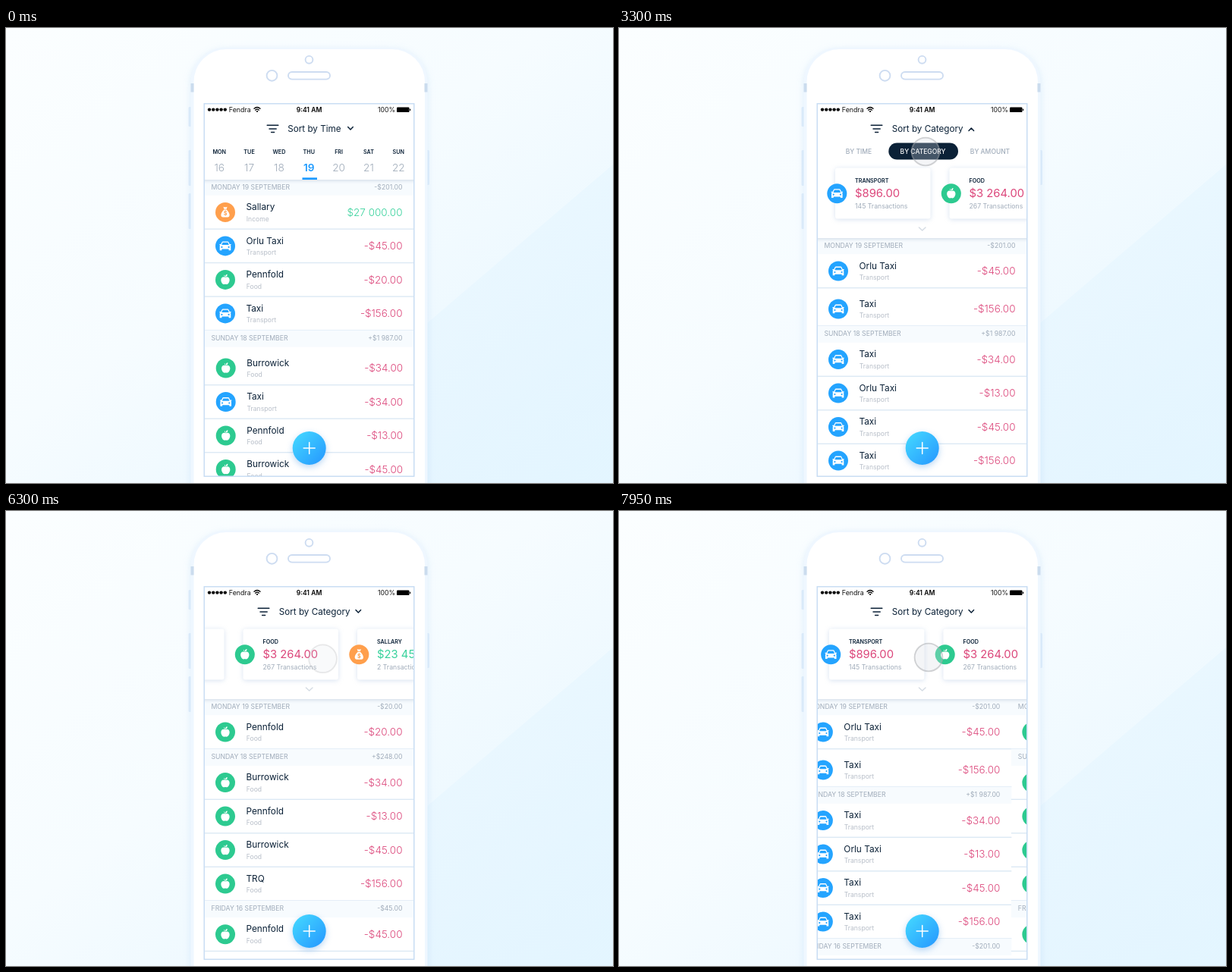
An HTML page for the animation above (8 s loop, 800 px wide and 600 px high).

```html
<!DOCTYPE html>
<html lang="en">
<head>
<meta charset="utf-8">
<title>Expense list</title>
<style>
html, body { margin: 0; width: 100%; height: 100%; overflow: hidden; background: #f5fbff; }
svg { display: block; width: 800px; height: 600px; font-family: Inter, "Open Sans", sans-serif; }
.line { fill: none; stroke-width: 1.5; stroke-linecap: round; stroke-linejoin: round; }
.body { filter: drop-shadow(0 3px 5px rgba(150, 195, 235, .27)); }
.panel { filter: drop-shadow(0 1px 2.5px rgba(70, 110, 150, .24)); }
.card { filter: drop-shadow(0 1px 3px rgba(120, 155, 205, .3)); }
.plus { filter: drop-shadow(0 3px 4px rgba(40, 130, 220, .32)); }
</style>
</head>
<body>
<svg id="stage" viewBox="0 0 800 600"></svg>
<script>
const NAVY = '#0b2137', BLUE = '#24a4ff', PINK = '#dc477b', GREEN = '#38d29c', GRAY = '#a0acba';
const DURATION = 8000, PAGE = 275.5, CARD_STEP = 150.5;

// Text placed by the middle of its capitals.
const text = (x, y, str, size, fill = NAVY, weight = 400, anchor = 'start') =>
  `<text x="${x}" y="${(y + size * 0.36).toFixed(2)}" font-size="${size}" fill="${fill}" font-weight="${weight}" text-anchor="${anchor}">${str}</text>`;
const rect = (x, y, w, h, fill, r = 0, extra = '') =>
  `<rect x="${x}" y="${y}" width="${w}" height="${h}" rx="${r}" fill="${fill}" ${extra}/>`;
const path = (d, fill = '#fff') => `<path d="${d}" fill="${fill}"/>`;
const dot = (x, y, r, fill, extra = '') => `<circle cx="${x}" cy="${y}" r="${r}" fill="${fill}" ${extra}/>`;
const group = (id, inner, extra = '') => `<g id="${id}" ${extra}>${inner}</g>`;
const at = (x, y, inner) => `<g transform="translate(${x} ${y})">${inner}</g>`;

const KINDS = {
  Transport: { color: BLUE, art: c =>
    path('M-7.6-2.4H-5.7L-4.4-5.2Q-4-6-3.2-6H3.2Q4-6 4.4-5.2L5.7-2.4H7.6V-1.2H6.7Q7.3-.5 7.3.5V5.8H4.6V4.2H-4.6V5.8H-7.3V.5Q-7.3-.5-6.7-1.2H-7.6Z') +
    path('M-4.8-1.3L-3.4-4.6H3.4L4.8-1.3Z', c) + dot(-4.6, 1.5, 1.1, c) + dot(4.6, 1.5, 1.1, c) },
  Food: { color: '#2dca90', art: () => '<g transform="scale(.94)">' +
    path('M0-3.2C-2-4.6-6-4.2-6 .3C-6 4-3.4 6.8-1.6 6.6Q0 6 1.6 6.6C3.4 6.8 6 4 6 .3C6-4.2 2-4.6 0-3.2Z') +
    path('M.2-4C0-6 1-7.4 2.8-7.6C3-5.6 2-4 .2-4Z') + path('M-.3-3L-2-6.2L-1.2-6.6L.4-3Z') + '</g>' },
  Income: { color: '#ff9f4c', art: c =>
    path('M-2.6-7.2Q0-6 2.6-7.2L1.6-4.2H-1.6Z') +
    path('M-1.7-3.5H1.7Q5.6.5 5.6 3.6Q5.6 6.6 3 6.6H-3Q-5.6 6.6-5.6 3.6Q-5.6.5-1.7-3.5Z') +
    text(0, 2, '$', 7.2, c, 700, 'middle') },
  Sport: { color: NAVY, art: () =>
    rect(-7.6, -0.8, 15.2, 1.6, '#fff') + [-1, 1].map(s =>
      rect(s * 4.1 - 1.1, -4.6, 2.2, 9.2, '#fff', 0.8) + rect(s * 6.4 - 0.8, -3, 1.6, 6, '#fff', 0.6)).join('') }
};
const icon = (kind, x, y) => at(x, y, dot(0, 0, 13, KINDS[kind].color) + KINDS[kind].art(KINDS[kind].color));

// A three-part entry is a transaction, a two-part entry is a day heading.
const cab = (sum, tall) => ['Transport', 'Taxi', sum, tall];
const orlu = sum => ['Transport', 'Orlu Taxi', sum];
const shop = sum => ['Food', 'Pennfold', sum];
const diner = (sum, tall) => ['Food', 'Burrowick', sum, tall];
const pay = sum => ['Income', 'Sallary', sum];
const MON = 'MONDAY 19 SEPTEMBER', SUN = 'SUNDAY 18 SEPTEMBER', FRI = 'FRIDAY 16 SEPTEMBER';
const LISTS = {
  time: [[MON, '-$201.00'], pay('$27 000.00'), orlu('-$45.00'), shop('-$20.00'), cab('-$156.00'),
    [SUN, '+$1 987.00'], diner('-$34.00', true), cab('-$34.00'), shop('-$13.00'), diner('-$45.00')],
  transport: [[MON, '-$201.00'], orlu('-$45.00'), cab('-$156.00', true), [SUN, '+$1 987.00'],
    cab('-$34.00'), orlu('-$13.00'), cab('-$45.00'), cab('-$156.00'), [FRI, '-$201.00'], cab('-$45.00')],
  food: [[MON, '-$20.00'], shop('-$20.00'), [SUN, '+$248.00'], diner('-$34.00'), shop('-$13.00'),
    diner('-$45.00'), ['Food', 'TRQ', '-$156.00'], [FRI, '-$45.00'], shop('-$45.00')],
  income: [[MON, '+$27 000.00'], pay('$27 000.00'), ['SUNDAY 10 AUGUST', '+$25 000.00'], pay('$25 000.00')]
};

function list(items, tailShift = 0) {
  let y = 0;
  return items.map((item, i) => {
    const [a, b, sum, tall] = item, top = y;
    if (!sum) {
      y += i ? 22.1 : 21.2;
      return rect(261.5, top, 276, y - top, '#f7fbfe') +
        text(270.5, top + 10.3, a, 8.7, GRAY) + text(522.5, top + 10.3, b, 8.7, GRAY, 400, 'end');
    }
    y += tall ? 50 : 44.5;
    const mid = y - 22.2, dx = i > 5 ? tailShift : 0;
    return rect(261.5, y - 0.7, 276, 1.4, '#dce9f4') + icon(a, 289 + dx, mid) +
      text(316.5 + dx, mid - 7, b, 11.8) + text(316.8 + dx, mid + 8.6, a, 8.6, '#b8bfc9') +
      text(522.5 + dx, mid, sum, 13.5, sum[0] === '-' ? PINK : GREEN, 300, 'end');
  }).join('');
}

const CARDS = [['Transport', 'TRANSPORT', '$896.00', 145], ['Food', 'FOOD', '$3 264.00', 267],
  ['Income', 'SALLARY', '$23 456.00', 2], ['Sport', 'SPORT', '$234.00', 8]];
const cards = CARDS.map(([kind, label, sum, count], i) => at(i * CARD_STEP, 0,
  rect(0, 155.5, 125.5, 67, '#fff', 3, 'class="card"') + icon(kind, 2.3, 189.2) +
  text(26, 172, label, 7.2, NAVY, 600) + text(26, 188.6, sum, 14.8, kind === 'Income' ? GREEN : PINK) +
  text(26, 206, count + ' Transactions', 8.7, GRAY))).join('');

const week = ['MON', 'TUE', 'WED', 'THU', 'FRI', 'SAT', 'SUN'].map((day, i) => {
  const x = 281.2 + i * 39.35, on = i === 3;
  return text(x, 163.3, day, 7.2, NAVY, 600, 'middle') +
    text(x, 184, 16 + i, 13.7, on ? '#1e9bff' : GRAY, on ? 600 : 300, 'middle');
}).join('') + rect(390.5, 197.3, 19.5, 2.7, '#1e9bff');

const TABS = [[316, 'BY TIME'], [400.5, 'BY CATEGORY'], [489, 'BY AMOUNT']];
const tab = (i, fill) => text(TABS[i][0], 162.8, TABS[i][1], 8.5, fill, 500, 'middle');
const tabs = TABS.map((_, i) => tab(i, GRAY)).join('') + rect(279, 151.5, 74, 22, NAVY, 11, 'id="pill"') +
  group('tabTime', tab(0, '#fff')) + group('tabCategory', tab(1, '#fff'));

const status = [0, 1, 2, 3, 4].map(i => dot(268 + i * 5.2, 107.6, 2.2, '#000')).join('') +
  text(293.8, 107.6, 'Fendra', 8.8, '#111') +
  '<g class="line" stroke="#000" style="stroke-width:1.3"><path d="M327 106.3Q331 102.8 335 106.3M328.6 108.2Q331 106.2 333.4 108.2"/></g>' +
  dot(331, 110, 1.1, '#000') + text(399.5, 107.6, '9:41 AM', 8.6, '#000', 600, 'middle') +
  text(513, 107.6, '100%', 8.7, '#111', 400, 'end') + rect(515, 104.5, 16.5, 6.6, '#000', 1.2) + rect(532, 106.5, 1.2, 2.6, '#000', 0.5);

const heading = group('menu', '<path class="line" stroke="#0b2137" d="M344.2 128.2H358.8M347 132.9H356.2M349.6 137.6H353.6"/>') +
  group('titleTime', text(371.2, 132.8, 'Sort by Time', 11.7)) +
  group('titleCategory', text(359.7, 132.8, 'Sort by Category', 11.7)) +
  '<path id="arrow" class="line" stroke="#0b2137" d="M-3.3-1.7L0 1.7L3.3-1.7"/>';

const TRIM = '#cddcf1', BUTTON = '#e1eefb';
const phone =
  [[104, 26], [161, 47], [218, 47]].map(([y, h]) => rect(240.5, y, 4, h, BUTTON, 1.5)).join('') +
  rect(554, 161, 4, 46, BUTTON, 1.5) +
  rect(243.5, 25.5, 312, 640, '#eff7ff', 46, 'class="body"') + rect(247.5, 28, 304.5, 640, '#fff', 43) +
  rect(243.5, 73, 4, 11.5, '#cbdcee') + rect(551.5, 73, 4, 11.5, '#cbdcee') +
  `<g fill="none" stroke="${TRIM}" stroke-width="1.9"><circle cx="399.5" cy="41.8" r="4.9"/>` +
  '<circle cx="350.5" cy="62.8" r="6.9"/><rect x="372" y="58" width="55" height="9.6" rx="4.8"/></g>';

document.getElementById('stage').innerHTML = `
<defs>
  <linearGradient id="sky" x1="0" y1="0" x2="1" y2="1">
    <stop offset="0" stop-color="#fbfeff"/><stop offset=".45" stop-color="#f6fcff"/><stop offset="1" stop-color="#e4f5ff"/></linearGradient>
  <linearGradient id="sheen" x1="0" y1="0" x2="1" y2="1">
    <stop offset=".3" stop-color="#dff3ff" stop-opacity=".36"/><stop offset="1" stop-color="#e2f5ff" stop-opacity=".5"/></linearGradient>
  <linearGradient id="aqua" x1=".1" y1=".1" x2=".9" y2=".9">
    <stop offset="0" stop-color="#42d4ff"/><stop offset="1" stop-color="#289dff"/></linearGradient>
  <clipPath id="screen"><rect x="261.5" y="100" width="276" height="491"/></clipPath>
</defs>
${rect(0, 0, 800, 600, 'url(#sky)')}
<path d="M540 402L800 180V600H540Z" fill="url(#sheen)"/>
${phone}
<g clip-path="url(#screen)">
  ${rect(261, 99, 277, 493, '#fff')}
  ${group('timeList', list(LISTS.time, 0.7))}
  ${group('pages', ['transport', 'food', 'income'].map((k, i) => at(i * PAGE, 0, list(LISTS[k]))).join(''))}
  ${group('panel', rect(255, -150, 290, 350, '#fff', 0, 'class="panel"'))}
  ${group('week', week)}
  ${group('cards', cards)}
  <path id="handle" class="line" stroke="#d5dce4"/>
  ${group('tabs', tabs)}
  ${heading}${status}
  ${dot(399.7, 554, 22, 'url(#aqua)', 'class="plus"')}
  <path class="line" stroke="#fff" d="M392.2 554H407.2M399.7 546.5V561.5"/>
  ${dot(0, 0, 18.4, 'rgba(215,220,224,.28)', 'id="touch" stroke="rgba(165,168,172,.5)" stroke-width="1.8"')}
</g>
${rect(261.2, 99.8, 276.6, 491.4, 'none', 0, 'stroke="#c5dbf3" stroke-width="1.4"')}`;

const parts = {};
document.querySelectorAll('#stage [id]').forEach(el => parts[el.id] = el);

// Each track is a table of [ms, value] with a smooth step between entries.
const TRACKS = {
  open: [[1250, 0], [1700, 1], [4530, 1], [4970, 0]],
  category: [[2700, 0], [3150, 1]],
  cardX: [[2700, 345], [3120, 283], [3300, 285], [3500, 287], [5200, 287], [5707, 162], [6450, 162], [6950, 11], [7350, 11], [8029, 287]],
  pageX: [[5200, 0], [5784, -PAGE], [6450, -PAGE], [6900, -555], [7150, -2 * PAGE], [7350, -2 * PAGE], [8029, 0]],
  touchX: [[700, 425], [1150, 409], [2150, 409], [2600, 404], [3500, 404], [4350, 411], [4700, 411], [5150, 470], [5650, 406], [6000, 404], [6400, 420], [6950, 352], [7350, 352], [7950, 408]],
  touchY: [[700, 165], [1150, 138], [2100, 142], [2600, 163], [3500, 163], [4350, 135], [4700, 135], [5150, 192], [5650, 191], [6400, 195], [6950, 202], [7350, 202], [7950, 193]],
  touchAlpha: [[750, 0], [1000, 1], [5850, 1], [6050, 0], [6200, 0], [6400, 1]]
};
function valueAt(keys, t) {
  const i = keys.findIndex(k => k[0] > t);
  if (i === 0) return keys[0][1];
  if (i < 0) return keys[keys.length - 1][1];
  const [t0, a] = keys[i - 1], [t1, b] = keys[i], u = (t - t0) / (t1 - t0);
  return a + (b - a) * u * u * (3 - 2 * u);
}

const mix = (a, b, u) => a + (b - a) * u;
const move = (id, x, y, more = '') => parts[id].setAttribute('transform', `translate(${x} ${y}) ${more}`);
const fade = (id, v) => parts[id].setAttribute('opacity', v);

function draw(t) {
  const v = {};
  for (const name in TRACKS) v[name] = valueAt(TRACKS[name], t);
  const { open, category } = v, drop = 29 * open;
  const top = mix(199.4 + 30 * open, 248 + drop, category);

  move('timeList', 0, top);
  fade('timeList', 1 - category);
  move('pages', v.pageX, top);
  fade('pages', category);
  move('panel', 0, 48 * category + drop);
  move('week', 0, drop);
  fade('week', 1 - category);
  move('cards', v.cardX, drop);
  fade('cards', category);

  const h = 2 + Math.min(4.5, 9 * Math.sin(Math.PI * open));
  parts.handle.setAttribute('d', `M-4.3 ${-h}L0 ${h}L4.3 ${-h}`);
  move('handle', 399.7, 235 + 30 * open);
  fade('handle', category);

  move('tabs', 0, drop - 29);
  fade('tabs', open);
  parts.pill.setAttribute('x', mix(279, 355.3, category));
  parts.pill.setAttribute('width', mix(74, 91.7, category));
  fade('tabTime', 1 - category);
  fade('tabCategory', category);

  move('menu', -12 * category, 0);
  fade('titleTime', 1 - category);
  fade('titleCategory', category);
  move('arrow', mix(454, 464.3, category), 132.3 + 1.5 * open, `rotate(${180 * open})`);

  move('touch', v.touchX, v.touchY);
  fade('touch', v.touchAlpha);
}

const start = performance.now();
function tick() {
  draw((performance.now() - start) % DURATION);
  requestAnimationFrame(tick);
}
tick();
</script>
</body>
</html>
```
